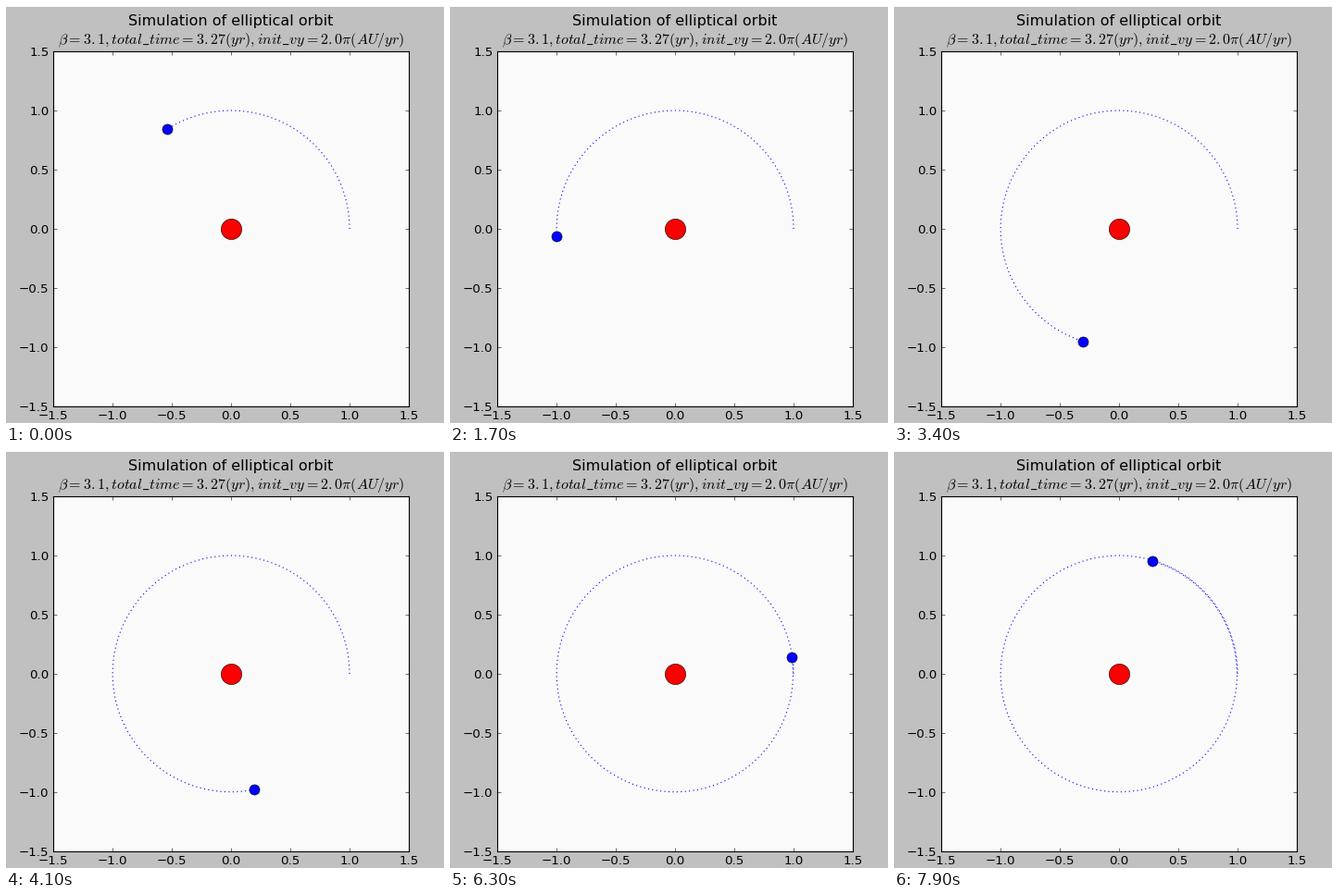
Write a matplotlib script that moves like this. It is 473x451 px and loops after 8000 ms.

```python
import numpy as np
import matplotlib.pyplot as plt
from matplotlib.animation import FuncAnimation
from matplotlib.patches import Rectangle
from matplotlib.transforms import Affine2D

W, H, DPI = 473, 451, 80
LEFT, TOP, SIDE = 51, 49, 384
FRAMES, INTERVAL = 80, 100
FIRST_STEP = 34
PAPER = "#fafafa"

plt.style.use("classic")
plt.rcParams.update({
    "font.family": "DejaVu Sans",
    "mathtext.fontset": "cm",
    "savefig.dpi": "figure",
    "savefig.facecolor": "auto",
})


def orbit(step):
    """Nearly circular path that slowly shrinks and speeds up."""
    a = np.radians(3.6 * step)
    r = 1 - 1e-4 * a**2
    a = a + 2e-4 / 3 * a**3
    return r * np.cos(a), r * np.sin(a)


# Simulation steps shown per tick: usually one, sometimes two, once none.
advance = np.ones(FRAMES, int)
advance[[0, 14]] = 0
advance[[10, 18, 27, 36, 45, 54, 64, 73]] = 2
steps = FIRST_STEP + np.cumsum(advance)

fig = plt.figure(figsize=(W / DPI, H / DPI), dpi=DPI, facecolor="#c0c0c0")
# Light line along the top edge.
fig.add_artist(Rectangle((0, 1 - 1 / H), 1, 1 / H, color=PAPER, lw=0,
                         transform=fig.transFigure))
ax = fig.add_axes([LEFT / W, 1 - (TOP + SIDE) / H, SIDE / W, SIDE / H],
                  facecolor=PAPER)
ax.set(xlim=(-1.5, 1.5), ylim=(-1.5, 1.5))
ax.set_xticks(np.arange(-1.5, 1.6, 0.5))
ax.set_yticks(np.arange(-1.5, 1.6, 0.5))
for label in ax.get_yticklabels():
    label.set_transform(label.get_transform() + Affine2D().translate(0, -1))


def heading(text, x, baseline):
    fig.text(x / W, 1 - baseline / H, text,
             size=14.4, ha="center", va="baseline")


heading("Simulation of elliptical orbit", 242.3, 21)
# Braces after the decimal points keep the wide punctuation spacing.
heading(r"$\beta=3.{1},total\_time=3.{27}(yr),init\_vy=2.{0}\pi(AU/yr)$",
        243.3, 41)

trail, = ax.plot([], [], "b:", lw=1)
ax.plot([0], [0], "o", color="#fa0000", mec="k", ms=20, mew=0.5)
planet, = ax.plot([], [], "bo", ms=10, mew=0.5)


def draw(i):
    x, y = orbit(np.arange(steps[i] + 1))
    trail.set_data(x, y)
    planet.set_data(x[-1:], y[-1:])
    return trail, planet


anim = FuncAnimation(fig, draw, frames=FRAMES, interval=INTERVAL,
                     repeat=True, repeat_delay=0)
plt.show()
```
